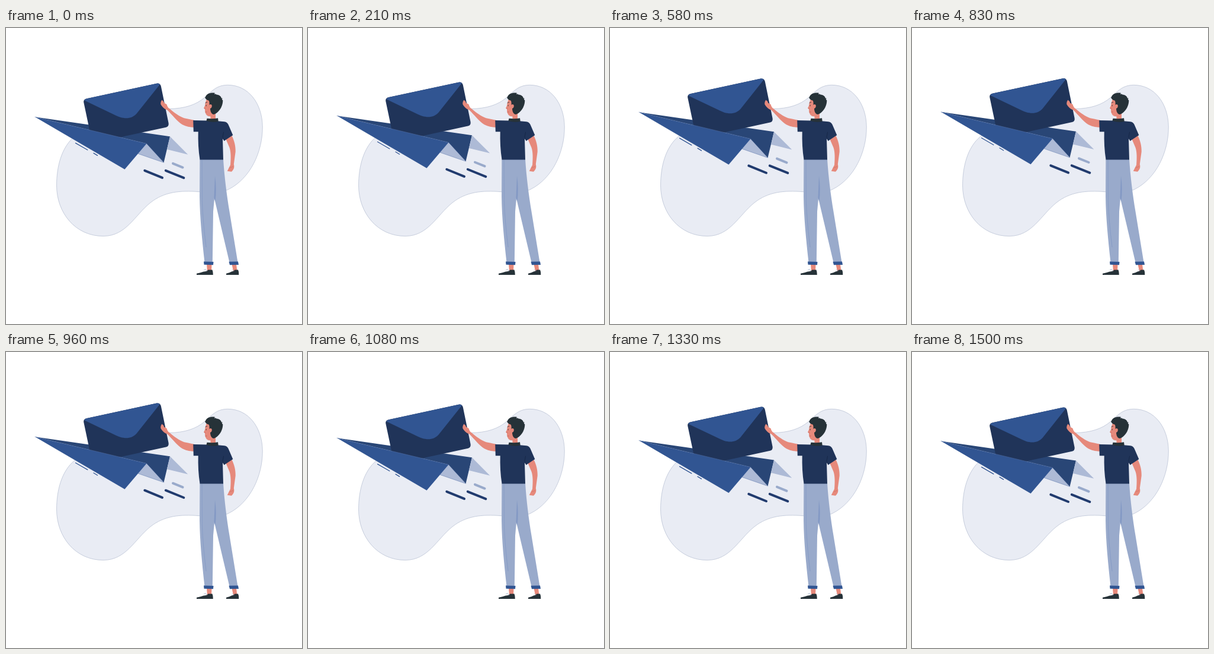
Animation of 500x500 px, one loop 1.54 s. Source, as an HTML page:

```html
<!DOCTYPE html>
<html lang="en">
<head>
<meta charset="utf-8">
<title>Sending a letter</title>
<style>
html, body { margin: 0; width: 100%; height: 100%; overflow: hidden; background: #fff; }
svg { display: block; width: 100vw; height: 100vh; }
.skin { fill: #e6897b; }
.navy { fill: #203459; }
.blue { fill: #315592; }
.back { fill: #294676; }
.pale { fill: #adbad6; }
.ink { fill: #263238; }
.jeans { fill: #99aacb; }
.line { fill: none; stroke-linecap: round; }
</style>
</head>
<body>
<svg viewBox="0 0 500 500">
  <!-- backdrop -->
  <path fill="#e9ecf4" stroke="#a9b4c9" stroke-width=".6" d="M374 96.3C410 96 433 128 433.3 167C433.500 209 413 254 376 272.500C359 281 343 277.500 327 276.700C293 274 267 277 244 295C217 317 203 351 165 351.600C117 352 85.500 312 85.500 266C85.500 231 95 203 112 186.500C148 151 212 139 275 136.600C302 136 321 130 336 117C349 105 357 96.500 374 96.300Z"/>

  <!-- plane with letter -->
  <g id="plane">
    <path class="back" d="M49 150L277 183L266.500 227L237 195Z"/>
    <path class="navy" d="M136.500 118.800L254.500 93.400Q260.300 92.300 261.800 98L274.600 160.500Q275.500 166 270.300 167.300L152 193Q146 194 144.500 188L131.200 125Q130.500 120 136.500 118.800Z"/>
    <path class="blue" d="M132.300 122Q133.600 119.400 136.500 118.800L254.500 93.400Q258 92.700 260 94.800L220.500 144.500C214 152 204 153.600 193 150.500Q189.500 149.300 186 147.700Z"/>
    <path class="pale" d="M237 195L266.500 227L222.500 211.800Z"/>
    <path class="pale" d="M277 183L307.300 213.300L272 204.700Z"/>
    <path class="blue" d="M49 150L237.500 195L200.500 238.500Z"/>
    <path class="line" stroke="#5673a8" stroke-width=".5" d="M49 150L237.500 195L266.500 227L222.500 211.800"/>
    <g class="line" stroke="#315592" stroke-width="1.3">
      <path d="M117.500 194L137.800 205.700M148 211L154.500 215"/>
    </g>
    <g class="line" stroke="#213b6e" stroke-width="4">
      <path d="M234.300 240.500L264 252.600M269.800 240.500L300.300 252.800"/>
      <path stroke="#99aacb" d="M282 228.500L298.500 235.200"/>
    </g>
  </g>

  <!-- legs -->
  <path class="skin" d="M339 399H347.500L347 411H340ZM381.500 399H389L390.500 411H384Z"/>
  <path class="ink" d="M322 417V414.800Q329 413.500 334 411.500Q339 411.500 341.500 408.600L348.500 408.400Q350 412 349.800 417ZM372 417V414.800Q378 413.500 381 411.500Q385 411 386.500 408.600L392 408.400Q393.800 412 393.300 417Z"/>
  <path class="line" stroke="#99aacb" stroke-width=".8" d="M334.500 409L337 407.500L339.500 410.500M383 408.500L385 410"/>
  <path class="jeans" d="M327.300 221.500H367C369 252 373 283 377.500 310L391.500 396H377.500L352 288L350 310L348.800 396H335.500C331 355 327.500 320 327 285Z"/>
  <path fill="#8298c4" d="M353 250Q356 271 353.500 293L351.500 287Z"/>
  <path class="line" stroke="#8298c4" stroke-width=".8" d="M331 223L331.300 292Q332.500 325 338 370"/>
  <path class="blue" d="M334 394.500L350.500 395L350 400.200L334.500 399.800ZM376.500 394.800L392 394.500L393 400L378 400.300Z"/>

  <!-- arms -->
  <path class="skin" d="M318 155.700V168C311 167.800 304 166.500 298 163.300C289 157.500 281 147 272.500 138.500C268.500 137.500 263.500 133.500 261.200 128.500Q261.300 124 263.200 121.500Q266 123 267 126.500L271.500 129Q272.200 132 274 134.500C284 143 293 149.500 301 152.300Z"/>
  <path class="skin" d="M371.500 188L381.500 182C385.500 190 388 199 387.700 209L384.800 230Q386.500 236 383 240.500L381 242.700L373.800 241.800Q376.500 236 379 231.500C380 220 380 209 377.500 202Z"/>
  <path class="line" stroke="#c96f64" stroke-width=".6" d="M378 236L384 234"/>

  <!-- shirt -->
  <path class="navy" d="M316.200 156L341 156.500L358 157.200L369 158.200Q373.500 159 375.500 163L383.300 181L368.500 190.700L366 187L367 222.500H327.500C325 207 324.300 191 324.700 175.300H316.800Z"/>
  <path class="line" stroke="#152544" stroke-width=".8" d="M367.500 176L366 184L368.700 190"/>

  <!-- head -->
  <path class="skin" d="M345 140H354V154Q349 156.500 345.500 153.500Z"/>
  <path class="ink" d="M339.500 152.800Q349 154 358 152.300L358.700 157.800Q348 160 338.500 157Z"/>
  <path class="skin" d="M339 120Q336.500 125 336 131L334.200 135.300L336 137.200C336 144 338.500 149 344 149.300C350 149.500 354 144 354 137L353 122Z"/>
  <path class="ink" d="M337 116.500C338.500 111 345 108.800 352.800 109.800L352 112Q354 110.800 355.500 112.500C360.500 113 363.500 115.500 364 119L365.500 118L364.800 121L366.300 122C366.500 131 361.500 139 356.500 143Q352 147 349 145.500C346 143.500 344.800 139.500 345 135L343.500 129.500C343.800 126 343.500 124 342.500 122.500Q338.500 122 336 117.500Z"/>
  <ellipse class="skin" cx="345" cy="132.500" rx="2.700" ry="3.600" transform="rotate(15 345 132.500)"/>
  <path class="line" stroke="#263238" stroke-width=".8" d="M337 126.500L339.800 125.300M338.200 130.200V131.800"/>
  <path class="line" stroke="#b95a52" stroke-width=".7" d="M334.800 135.500L336.500 136M336.800 142L339 141.800"/>
</svg>
<script>
const LOOP = 1540, STEPS = 37;
const plane = document.getElementById('plane');

function draw(ms) {
  const step = Math.floor((ms % LOOP) / LOOP * STEPS + 0.1);
  const swing = Math.cos((step - 17.5) / STEPS * 2 * Math.PI);
  const y = -4.1 - 4.5 * swing;
  plane.setAttribute('transform', `translate(0 ${y.toFixed(2)})`);
}

let start;
function tick(now) {
  start ??= now;
  draw(Math.max(0, now - start));
  requestAnimationFrame(tick);
}
draw(0);
requestAnimationFrame(tick);
</script>
</body>
</html>
```
